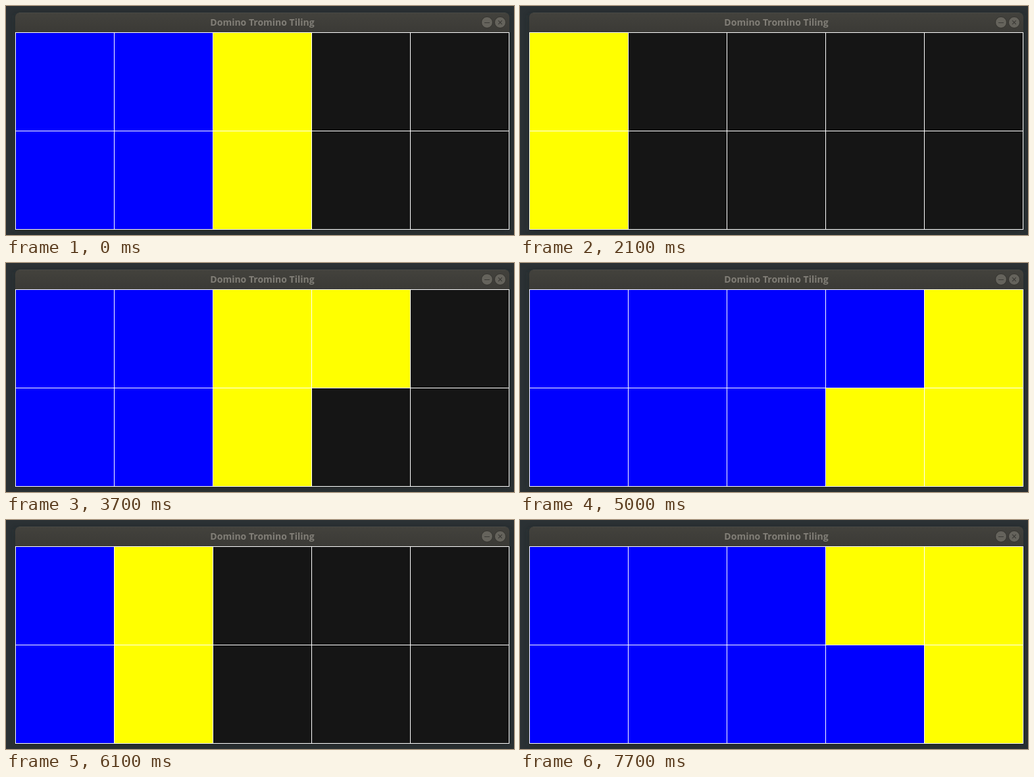
An HTML page for the animation above (8 s loop, 772 by 349 pixels).

```html
<!DOCTYPE html>
<html lang="en">
<head>
<meta charset="utf-8">
<title>Domino Tromino Tiling</title>
<style>
  html, body { margin: 0; width: 100%; height: 100%; overflow: hidden; background: #2b3033; }
  svg { display: block; width: 772px; height: 349px; }
  text { font: bold 14px "Open Sans", "Noto Sans", sans-serif; fill: #817e77; }
</style>
</head>
<body>
<svg viewBox="0 0 772 349">
  <defs>
    <linearGradient id="bar" x2="0" y2="1">
      <stop offset="0" stop-color="#43423d"/>
      <stop offset="1" stop-color="#3b3a36"/>
    </linearGradient>
    <filter id="soft" x="-10%" y="-10%" width="120%" height="120%">
      <feGaussianBlur stdDeviation="5"/>
    </filter>
  </defs>
  <rect width="772" height="349" fill="#2b3134"/>
  <rect x="14" y="14" width="751" height="330" fill="#1c2022" opacity=".55" filter="url(#soft)"/>
  <path d="M14 40V17a7 7 0 0 1 7-7H758a7 7 0 0 1 7 7V40Z" fill="url(#bar)"/>
  <path d="M20 10.5H759" stroke="#4a4944"/>
  <text x="389.5" y="30" text-anchor="middle">Domino Tromino Tiling</text>
  <g fill="#65635c" stroke="#34332f">
    <circle cx="731" cy="25" r="8.5"/>
    <circle cx="751" cy="25" r="8.5"/>
    <path d="M727 25.5h8M748.2 22.2l5.6 5.6m0-5.6l-5.6 5.6" fill="none" stroke="#3b3a36" stroke-width="1.2"/>
  </g>
  <g id="cells"></g>
  <path id="grid" stroke="#fff" fill="none" shape-rendering="crispEdges"/>
</svg>
<script>
  const LOOP = 8000, SIZE = 150, LEFT = 14, TOP = 40, COLS = 5, ROWS = 2;
  const COLORS = { B: "#0000ff", Y: "#ffff00", ".": "#151515" };

  // start time, then top row and bottom row of the board
  const STEPS = [
    [0,    "BBY.." + "BBY.."],
    [1000, "BBBYY" + "BBB.."],
    [1300, "BBBBB" + "BBBYY"],
    [2100, "Y...." + "Y...."],
    [2900, "BY..." + "BY..."],
    [3700, "BBYY." + "BBY.."],
    [5000, "BBBBY" + "BBBYY"],
    [5300, "Y...." + "Y...."],
    [6100, "BY..." + "BY..."],
    [6900, "BBY.." + "BBYY."],
    [7700, "BBBYY" + "BBBBY"]
  ];

  const group = document.getElementById("cells");
  const cells = Array.from({ length: COLS * ROWS }, (_, i) => {
    const cell = document.createElementNS("http://www.w3.org/2000/svg", "rect");
    cell.setAttribute("x", LEFT + (i % COLS) * SIZE);
    cell.setAttribute("y", TOP + Math.floor(i / COLS) * SIZE);
    cell.setAttribute("width", SIZE);
    cell.setAttribute("height", SIZE);
    return group.appendChild(cell);
  });

  let lines = "";
  for (let c = 0; c <= COLS; c++) lines += `M${LEFT + c * SIZE + 0.5} ${TOP}v${ROWS * SIZE + 1}`;
  for (let r = 0; r <= ROWS; r++) lines += `M${LEFT} ${TOP + r * SIZE + 0.5}h${COLS * SIZE + 1}`;
  document.getElementById("grid").setAttribute("d", lines);

  let shown = "";
  function draw(time) {
    const board = STEPS.filter(([at]) => at <= time).pop()[1];
    if (board === shown) return;
    shown = board;
    cells.forEach((cell, i) => cell.setAttribute("fill", COLORS[board[i]]));
  }

  const start = performance.now();
  function tick() {
    draw((performance.now() - start) % LOOP);
    requestAnimationFrame(tick);
  }
  tick();
</script>
</body>
</html>
```
